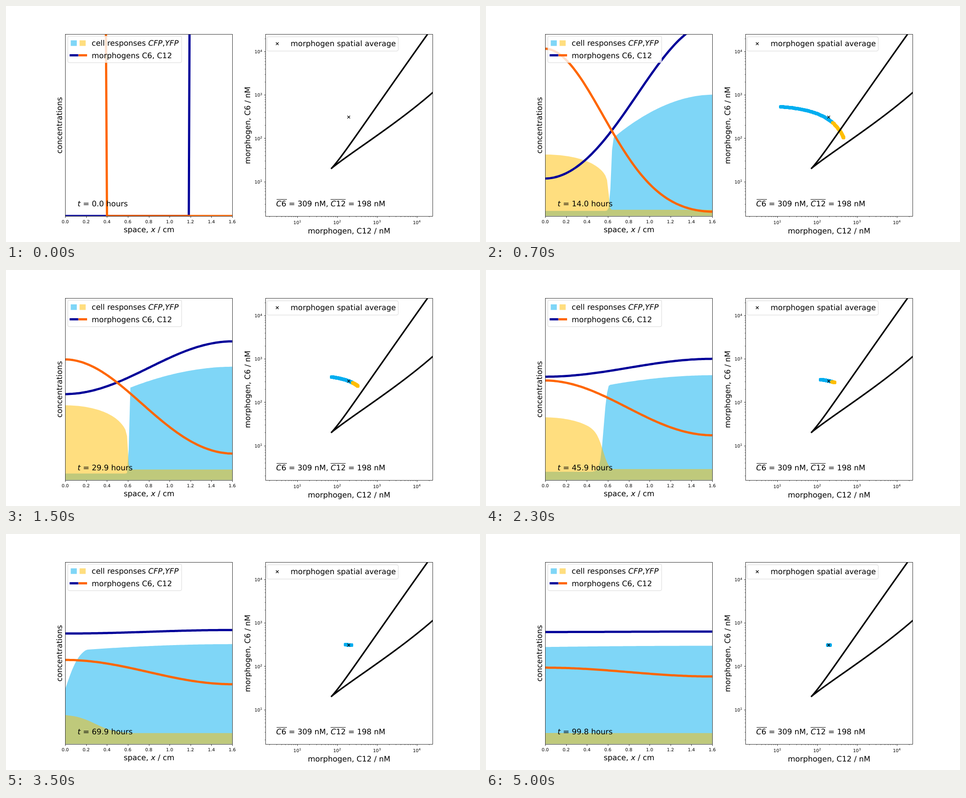
Animation, 1058 px wide and 529 px high, one loop 5.1 s. Source, as an HTML page with a canvas:

```html
<!DOCTYPE html>
<html lang="en">
<head>
<meta charset="utf-8">
<title>Morphogen patterning</title>
<style>
html, body { margin: 0; width: 100%; height: 100%; overflow: hidden; background: #fff; }
canvas { display: block; }
</style>
</head>
<body>
<canvas id="stage" width="1058" height="529"></canvas>
<script>
const ctx = document.getElementById('stage').getContext('2d');
ctx.textRendering = 'geometricPrecision';

const STEP = 100, STEPS = 51, HOURS = 1.996;
const N = 101, LENGTH = 1.6, MODES = 60;
const BLUE = '#00aef0', YELLOW = '#ffbe00', NAVY = '#000099', ORANGE = '#ff6600';
const A = { x: 132.25, y: 63.48, w: 372.7, h: 407.33 };
const B = { x: 579.49, y: 63.48, w: 372.7, h: 407.33 };
const BASE = A.y + A.h, NM = A.h / 500;
const LOG_MIN = Math.log10(1.6), LOG_SPAN = Math.log10(25000) - LOG_MIN;

// hours, CFP: right level, drop, floor, front, width; YFP: floor, height, front, width, roundness
const KEYS = [
  [0, 0, 0, 0, .7, .05, 0, 0, .68, .04, .3],
  [6, 165, 78, 6, .65, .02, 7, 66, .63, .02, .28],
  [14, 272, 107, 11.5, .63, .007, 14, 124, .61, .006, .25],
  [29.94, 254, 49, 14.5, .612, .004, 23.5, 144, .602, .004, .25],
  [45.9, 235, 22.5, 18.5, .56, .017, 24.5, 116, .563, .03, .32],
  [59.9, 227, 12, 32, .363, .049, 24.5, 78.3, .355, .095, .32],
  [83.8, 221.3, 2.05, 40, -.6, .08, 24.5, 4.9, .25, .1, .32],
  [99.9, 220.3, 1.15, 40, -1, .08, 24.5, .3, .2, .1, .32]
];

const sigmoid = v => 1 / (1 + Math.exp(-v));
const gridX = i => A.x + A.w * i / (N - 1);
const logX = v => B.x + B.w * (Math.log10(v) - LOG_MIN) / LOG_SPAN;
const logY = v => B.y + B.h * (1 - (Math.log10(v) - LOG_MIN) / LOG_SPAN);
const crisp = v => Math.round(v) + .5;

// Monotone cubic interpolation of one key column
function keyed(col, t) {
  let i = 0;
  while (i < KEYS.length - 2 && t > KEYS[i + 1][0]) i++;
  const slope = j => (KEYS[j + 1][col] - KEYS[j][col]) / (KEYS[j + 1][0] - KEYS[j][0]);
  const tangent = j => {
    if (j === 0) return slope(0);
    if (j === KEYS.length - 1) return slope(j - 1);
    const a = slope(j - 1), b = slope(j);
    return a * b > 0 ? 2 * a * b / (a + b) : 0;
  };
  const p = KEYS[i], q = KEYS[i + 1], dt = q[0] - p[0], u = (t - p[0]) / dt, v = 1 - u;
  return p[col] * (1 + 2 * u) * v * v + q[col] * (1 + 2 * v) * u * u
    + dt * u * v * (tangent(i) * v - tangent(i + 1) * u);
}

// Diffusion of a block of `cells` cells at one wall, by cosine modes
function diffuse(level, cells, rate, t, i) {
  if (t === 0) return i < cells ? level : 0;
  let sum = level * cells / N;
  for (let n = 1; n <= MODES; n++) {
    const amp = level / N * Math.sin(Math.PI * n * cells / N) / Math.sin(Math.PI * n / (2 * N));
    sum += amp * Math.exp(-rate * n * n * t) * Math.cos(Math.PI * n * (i + .5) / N);
  }
  return sum;
}

function solve(t) {
  const [right, drop, low, front, width, floor, height, edge, soft, round] =
    KEYS[0].slice(1).map((_, c) => keyed(c + 1, t));
  const s = { c6: [], c12: [], cfp: [], yfp: [] };
  for (let i = 0; i < N; i++) {
    const x = LENGTH * i / (N - 1);
    s.c12.push(diffuse(800, 25, .0339, t, i));
    s.c6.push(diffuse(1200, 26, .0678, t, N - 1 - i));
    const high = Math.max(low, right - drop * Math.pow(LENGTH - x, 1.9));
    s.cfp.push(low + (high - low) * Math.min(1, 1.05 * sigmoid((x - front) / width)));
    const fold = Math.pow(Math.max(0, 1 - (x / .625) ** 2), round);
    s.yfp.push(floor + height * fold * sigmoid((edge - x) / soft));
  }
  return s;
}

// Odd entries of `runs` are italic
function text(runs, x, y, size = 17, align = 0) {
  const font = i => `${i % 2 ? 'italic ' : ''}${size}px "DejaVu Sans", sans-serif`;
  const widths = runs.map((r, i) => { ctx.font = font(i); return ctx.measureText(r).width; });
  x -= align * widths.reduce((a, b) => a + b, 0);
  ctx.fillStyle = '#000';
  runs.forEach((r, i) => {
    ctx.font = font(i);
    ctx.fillText(r, x, y);
    x += widths[i];
  });
}

function upright(label, x, y) {
  ctx.save();
  ctx.translate(x, y);
  ctx.rotate(-Math.PI / 2);
  text([label], 0, 0, 17, .5);
  ctx.restore();
}

function line(x1, y1, x2, y2, width = 1, color = '#000') {
  ctx.strokeStyle = color;
  ctx.lineWidth = width;
  ctx.beginPath();
  ctx.moveTo(x1, y1);
  ctx.lineTo(x2, y2);
  ctx.stroke();
}

function clipped(box, draw) {
  ctx.save();
  ctx.beginPath();
  ctx.rect(box.x, box.y, box.w, box.h);
  ctx.clip();
  draw();
  ctx.restore();
}

function frame(box) {
  const x = crisp(box.x), y = crisp(box.y);
  ctx.strokeStyle = '#000';
  ctx.lineWidth = .8;
  ctx.strokeRect(x, y, crisp(box.x + box.w) - x, crisp(box.y + box.h) - y);
}

function area(values, color) {
  ctx.globalAlpha = .5;
  ctx.fillStyle = color;
  ctx.beginPath();
  ctx.moveTo(gridX(0), BASE);
  values.forEach((v, i) => ctx.lineTo(gridX(i), BASE - v));
  ctx.lineTo(gridX(N - 1), BASE);
  ctx.fill();
  ctx.globalAlpha = 1;
}

function curve(values, color) {
  ctx.strokeStyle = color;
  ctx.lineWidth = 5;
  ctx.lineJoin = 'round';
  ctx.beginPath();
  values.forEach((v, i) => ctx.lineTo(gridX(i), BASE - v * NM));
  ctx.stroke();
}

function legendBox(x, y, w, h) {
  ctx.beginPath();
  ctx.roundRect(x, y, w, h, 3.4);
  ctx.globalAlpha = .8;
  ctx.fillStyle = '#fff';
  ctx.fill();
  ctx.strokeStyle = '#ccc';
  ctx.lineWidth = 1;
  ctx.stroke();
  ctx.globalAlpha = 1;
}

function cross(x, y) {
  line(x - 3, y - 3, x + 3, y + 3, 1.3);
  line(x - 3, y + 3, x + 3, y - 3, 1.3);
}

function spacePlot(s, t) {
  clipped(A, () => {
    area(s.cfp, BLUE);
    area(s.yfp, YELLOW);
    curve(s.c6, NAVY);
    curve(s.c12, ORANGE);
  });
  frame(A);
  for (let k = 0; k <= 8; k++) {
    const x = A.x + A.w * k / 8;
    line(crisp(x), 471.5, crisp(x), 475, .8);
    text([(k * .2).toFixed(1)], x, 486.6, 10, .5);
  }
  text(['space, ', 'x', ' / cm'], 319.3, 507, 17, .5);
  upright('concentrations', 125, 267.5);
  text(['', 't', ` = ${t.toFixed(1)} hours`], 159.8, 449);

  legendBox(138, 67.5, 254, 59.5);
  ctx.globalAlpha = .5;
  ctx.fillStyle = BLUE;
  ctx.fillRect(144.5, 77, 13.5, 12.5);
  ctx.fillStyle = YELLOW;
  ctx.fillRect(164.3, 77, 13.5, 12.5);
  ctx.globalAlpha = 1;
  line(142, 110.5, 161.5, 110.5, 5, NAVY);
  line(162, 110.5, 181, 110.5, 5, ORANGE);
  text(['cell responses ', 'CFP', ',', 'YFP'], 191.3, 89);
  text(['morphogens C6, C12'], 191.3, 116.7);
}

function dots(s, color, wanted) {
  ctx.fillStyle = color;
  for (let i = 0; i < N; i++) {
    if (s.c6[i] < .1 || s.c12[i] < .1 || (s.cfp[i] > s.yfp[i]) !== wanted) continue;
    ctx.beginPath();
    ctx.arc(Math.round(logX(s.c12[i])), Math.round(logY(s.c6[i])), 4, 0, 2 * Math.PI);
    ctx.fill();
  }
}

function logAxes() {
  for (let d = 0; d <= 4; d++) {
    for (let m = 1; m < 10; m++) {
      const v = m * 10 ** d, size = m === 1 ? 3.5 : 2, width = m === 1 ? .8 : .6;
      if (v < 1.6 || v > 25000) continue;
      const x = logX(v), y = logY(v);
      line(crisp(x), 471.5, crisp(x), 471.5 + size, width);
      line(579.5 - size, crisp(y), 579.5, crisp(y), width);
      if (m > 1) continue;
      text(['10'], x - 8.7, 489, 10);
      text([`${d}`], x + 4.2, 485.2, 7);
      text(['10'], 554.7, y + 4.2, 10);
      text([`${d}`], 567.6, y + .4, 7);
    }
  }
}

function phasePlot(s) {
  clipped(B, () => {
    dots(s, BLUE, true);
    dots(s, YELLOW, false);
    ctx.strokeStyle = '#000';
    ctx.lineWidth = 3.4;
    ctx.lineJoin = 'round';
    ctx.beginPath();
    ctx.moveTo(941, 63);
    ctx.bezierCurveTo(800, 262, 751, 338, 726.5, 364);
    ctx.bezierCurveTo(760, 335, 868, 268, 953, 193.5);
    ctx.stroke();
    cross(Math.round(logX(198)), Math.round(logY(309)));
  });
  frame(B);
  logAxes();
  text(['morphogen, C12 / nM'], 765.9, 510, 17, .5);
  upright('morphogen, C6 / nM', 544.7, 267.5);
  text(['', 'C', '6 = 309 nM, ', 'C', '12 = 198 nM'], 603, 448.5);
  line(604, 433.5, 627, 433.5);
  line(724.5, 433.5, 758, 433.5);

  legendBox(582.5, 69, 293, 32);
  cross(605.5, 84.5);
  text(['morphogen spatial average'], 635.3, 90);
}

function render(now) {
  const t = Math.floor(now / STEP) % STEPS * HOURS;
  const s = solve(t);
  ctx.fillStyle = '#fff';
  ctx.fillRect(0, 0, 1058, 529);
  spacePlot(s, t);
  phasePlot(s);
}

let start = null;
function tick(now) {
  if (start === null) start = now;
  render(Math.max(0, now - start));
  requestAnimationFrame(tick);
}
render(0);
requestAnimationFrame(tick);
</script>
</body>
</html>
```
